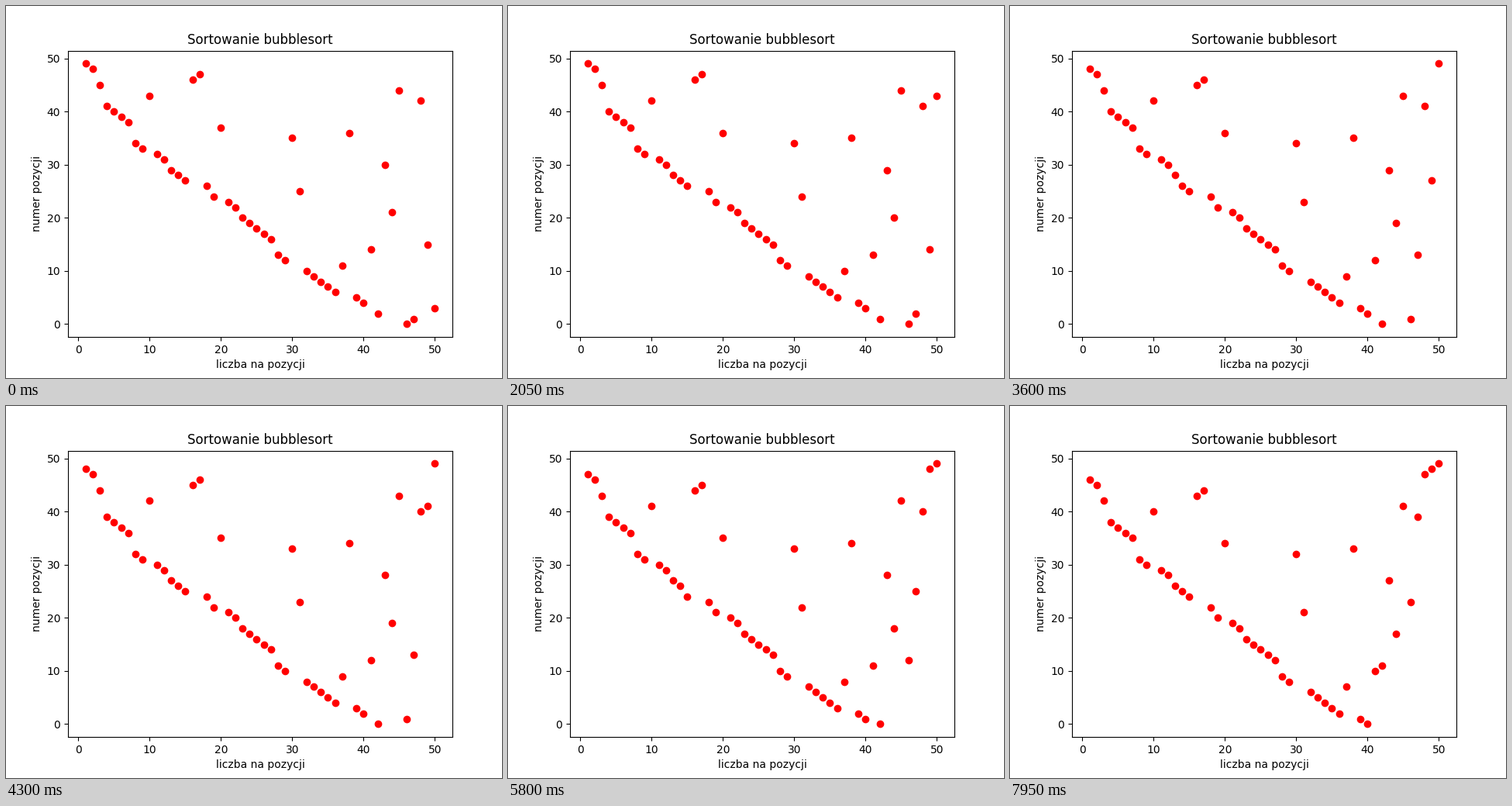
Recreate the animation shown at these times as a matplotlib script. Size 640 px wide and 480 px high, loop 8000 ms.

```python
import matplotlib.pyplot as plt
from matplotlib.animation import FuncAnimation

COUNT = 50
FRAMES = 160

# Values out of order, by position; all others descend.
STRAYS = {1: 47, 3: 50, 11: 37, 14: 41, 15: 49, 21: 44, 25: 31, 30: 43,
          35: 30, 36: 38, 37: 20, 42: 48, 43: 10, 44: 45, 46: 16, 47: 17}


def start_values():
    used = set(STRAYS.values())
    falling = (v for v in range(COUNT, 0, -1) if v not in used)
    return [STRAYS[p] if p in STRAYS else next(falling)
            for p in range(COUNT)]


def bubble_sort(values):
    """Yield the list at the start and after every swap."""
    a = list(values)
    yield a[:]
    for end in range(len(a) - 1, 0, -1):
        for i in range(end):
            if a[i] > a[i + 1]:
                a[i], a[i + 1] = a[i + 1], a[i]
                yield a[:]


states = [state for _, state in zip(range(FRAMES), bubble_sort(start_values()))]

fig, ax = plt.subplots(figsize=(6.4, 4.8), dpi=100)
dots, = ax.plot(states[0], range(COUNT), "ro")
ax.set_title("Sortowanie bubblesort")
ax.set_xlabel("liczba na pozycji")
ax.set_ylabel("numer pozycji")


def update(frame):
    dots.set_xdata(states[frame])
    return dots,


anim = FuncAnimation(fig, update, frames=FRAMES, interval=50, repeat=True,
                     repeat_delay=0)
plt.show()
```
